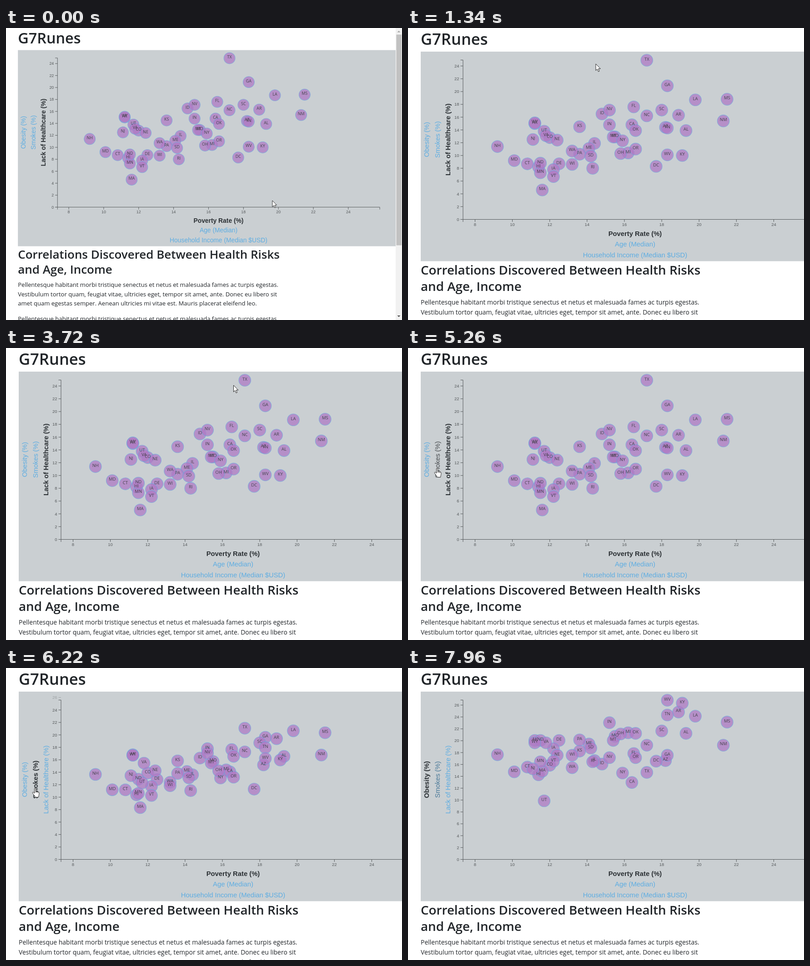
An HTML page that plays this animation: 871 by 643 pixels, repeating every 8000 ms.

```html
<!DOCTYPE html>
<html lang="en">
<head>
<meta charset="utf-8">
<title>Health risk chart</title>
<style>
  html, body { margin: 0; width: 100%; height: 100%; overflow: hidden; background: #fff; }
  svg { display: block; width: 871px; height: 643px; }
  .page { font-family: "Open Sans", "Noto Sans", sans-serif; fill: #212529; }
  .head { font-weight: 600; font-size: 27.74px; }
  .title { font-weight: 600; font-size: 34.6px; }
  .body { font-size: 13.97px; }
  .axis { font: 9.5px "Liberation Sans", Arial, sans-serif; fill: #55595b; }
  .axis path { fill: none; stroke: #55595b; }
  .label { font: 14.8px "Liberation Sans", Arial, sans-serif; fill: #5dade2; text-anchor: middle; }
  .on { font-weight: bold; fill: #2b3034; }
  .dot { fill: #af7ac5; stroke: #6ca3dd; stroke-width: 1.1; opacity: .75; }
  .code { font-size: 9.5px; text-anchor: middle; fill: #45424c; }
  .cursor { fill: #fff; stroke: #111; stroke-width: .9; stroke-linejoin: round; }
</style>
</head>
<body>
<svg id="stage" viewBox="0 0 871 643" xmlns="http://www.w3.org/2000/svg"></svg>
<script>
const LOOP = 8000;
const ZOOM = 1.0685;
const BASE = 421.5, TOP = 71, LEFT = 121;
const MOVE = 930, TO_SMOKES = 5795, TO_OBESITY = 7811;

// poverty, then code / lack of healthcare / smokes for each state
const rows = `9.2 NH 11.4 17.5
10.1 MD 9.2 14.6
10.8 CT 8.7 15.4
11.1 NJ 12.5 15.1
11.2 AK 15 19.9 WY 15.1 19.5
11.4 HI 8.2 14.1
11.5 MN 7.3 16.3 ND 8.8 19.9
11.6 MA 4.6 14.7
11.7 UT 13.8 9.7
11.8 VA 13.1 19.5
12 CO 12.8 15.7
12.2 IA 7.8 18.5 VT 6.7 16.4
12.4 NE 12.4 17.4
12.5 DE 8.7 19.9
13.2 WA 10.7 15.3 WI 8.6 17.4
13.6 KS 14.5 18.1 PA 10.2 20
14.1 ME 11.1 19.3
14.2 SD 9.9 18.6
14.3 RI 8 16.3
14.4 IL 11.9 16.5
14.8 ID 16.5 15.9
15.2 IN 14.8 22.9 NV 17.1 17
15.4 MT 12.9 19.9
15.5 MO 12.9 20.6
15.8 OH 10.3 21
15.9 NY 12.3 14.4
16.2 MI 10.4 21.2
16.4 CA 14.8 12.8
16.5 FL 17.6 17.7
16.6 OK 13.9 21.1 OR 11 17
17.2 NC 16.2 19.1 TX 24.9 14.5
17.7 DC 8.3 16.4
18 SC 17.1 21.5
18.2 AZ 14.4 16.5
18.3 GA 20.9 17.4 TN 14.3 24.2 WV 10.1 26.7
18.9 AR 16.3 24.7
19.1 KY 10 26.2
19.3 AL 13.9 21.1
19.8 LA 18.7 24
21.3 NM 15.4 19.1
21.5 MS 18.8 23`;

const states = rows.split('\n').flatMap(row => {
  const [poverty, ...rest] = row.split(' ');
  const list = [];
  for (let i = 0; i < rest.length; i += 3) {
    const smokes = +rest[i + 2];
    const obesity = Math.min(35.9, 15.5 + smokes * .78);
    list.push({ code: rest[i], poverty: +poverty, values: [+rest[i + 1], smokes, obesity] });
  }
  return list;
}).sort((a, b) => a.code < b.code ? -1 : 1);

const maxima = [24.9, 26.7, 35.9];
const steps = [2, 2, 5];

const stage = document.getElementById('stage');
function add(parent, tag, attrs = {}, text) {
  const el = document.createElementNS('http://www.w3.org/2000/svg', tag);
  for (const k in attrs) el.setAttribute(k, attrs[k]);
  if (text !== undefined) el.textContent = text;
  parent.appendChild(el);
  return el;
}

const clamp = v => Math.max(0, Math.min(1, v));
const lerp = (a, b, p) => a + (b - a) * p;
const span = (t, a, b) => clamp((t - a) / (b - a));
const smooth = p => p * p * (3 - 2 * p);
const cubic = p => p < .5 ? 4 * p ** 3 : 1 - (2 - 2 * p) ** 3 / 2;
const mix = (a, b, p) => `rgb(${a.map((c, i) => Math.round(lerp(c, b[i], p)))})`;
const xAt = v => 147.5 + (v - 8) * 41.06;
const yAt = (v, k) => BASE - v / maxima[k] * (BASE - TOP);

const page = add(stage, 'g', { class: 'page' });

// page text
add(page, 'text', { class: 'title', x: 28, y: 36.5 }, 'G7Runes');
[['Correlations Discovered Between Health Risks', 543], ['and Age, Income', 578.5]]
  .forEach(([s, y]) => add(page, 'text', { class: 'head', x: 28, y }, s));
const opening = 'Pellentesque habitant morbi tristique senectus et netus et malesuada fames ac turpis egestas.';
[[opening, 609],
 ['Vestibulum tortor quam, feugiat vitae, ultricies eget, tempor sit amet, ante. Donec eu libero sit', 631.2],
 ['amet quam egestas semper. Aenean ultricies mi vitae est. Mauris placerat eleifend leo.', 653.2],
 [opening, 689]]
  .forEach(([s, y]) => add(page, 'text', { class: 'body', x: 28, y }, s));

// chart panel and axes
add(page, 'rect', { x: 28, y: 52, width: 888, height: 461.5, fill: '#cacfd2' });
const axis = add(page, 'g', { class: 'axis' });
add(axis, 'path', { d: `M115.5 ${TOP - .5}H${LEFT}V${BASE}H115.5M${LEFT} 427V${BASE}H878.4V427` });
for (let v = 8; v <= 24; v += 2) {
  add(axis, 'path', { d: `M${xAt(v)} ${BASE}v5.5` });
  add(axis, 'text', { x: xAt(v), y: 436.3, 'text-anchor': 'middle' }, v);
}
const ticks = [];
for (let v = 0; v <= 35; v++) {
  if (v % 2 && v % 5) continue;
  const el = add(axis, 'g');
  add(el, 'path', { d: `M115.5 0H${LEFT}` });
  add(el, 'text', { x: 112.5, y: 3.3, 'text-anchor': 'end' }, v);
  ticks.push({ v, el });
}

// axis titles
[['Poverty Rate (%)', 458, 'label on'], ['Age (Median)', 481.3, 'label'],
 ['Household Income (Median $USD)', 504.5, 'label']]
  .forEach(([s, y, c]) => add(page, 'text', { class: c, x: 499.5, y }, s));
const labels = [['Lack of Healthcare (%)', 93.3], ['Smokes (%)', 69.7], ['Obesity (%)', 46.3]]
  .map(([s, x]) => add(page, 'text', { class: 'label', transform: `translate(${x} 245.7) rotate(-90)` }, s));

// states
const dots = states.map(s => add(page, 'circle', { class: 'dot', cx: xAt(s.poverty), r: 13.3 }));
const codes = states.map(s => add(page, 'text', { class: 'code', x: xAt(s.poverty) }, s.code));

// scrollbar
const bar = add(page, 'g', { transform: `scale(${ZOOM})` });
add(bar, 'rect', { x: 857, y: 0, width: 15, height: 644, fill: '#f1f1f1' });
add(bar, 'rect', { x: 858.5, y: 14.5, width: 11.5, height: 464, fill: '#c1c1c1' });
add(bar, 'path', { d: 'M860.5 9.5L864 6L867.5 9.5Z', fill: '#a3a3a3' });
add(bar, 'path', { d: 'M860.5 633L864 636.5L867.5 633Z', fill: '#505050' });

// pointers
const arrow = add(page, 'path', { class: 'cursor', d: 'M0 0V14.6L3.3 11.5L5.6 17L8 16L5.7 10.7H10.3Z' });
const hand = add(page, 'g', { class: 'cursor' });
add(hand, 'path', { d: 'M-1.4 1.4C-1.4-.5 1.4-.5 1.4 1.4V7L7 8.2C8.6 8.6 9 9.6 9 11C9 14 8 15.4 7.6 20H.2C-.8 16.6-3.6 14-5.6 10.8C-6.4 9.2-4.4 8.2-3.2 9.4L-1.4 11.2Z' });
add(hand, 'path', { d: 'M1.4 7V10.5M4 7.7V10.7M6.5 8.2V11', fill: 'none', 'stroke-width': .7 });

const route = [
  [0, 626, 406], [90, 626, 406], [870, 360, 117], [960, 358, 114], [1060, 358, 114],
  [1340, 413, 79], [1700, 515, 82], [1950, 456, 80], [2330, 600, -4], [3630, 600, -4],
  [3720, 500.5, 82], [4410, 149, 245], [4710, 149, 245], [5260, 64, 264.5],
  [6830, 64, 264.5], [7380, 41, 250], [LOOP, 41, 250]
];
function pointerAt(t) {
  const i = route.findIndex(r => r[0] > t);
  const a = route[i - 1], b = route[i];
  const p = smooth(span(t, a[0], b[0]));
  return [lerp(a[1], b[1], p), lerp(a[2], b[2], p)];
}

const BLUE = [93, 173, 226], DARK = [43, 48, 52], HOVER = [72, 76, 79];
function setLabel(k, active, color) {
  labels[k].setAttribute('class', active ? 'label on' : 'label');
  labels[k].style.fill = color;
}

function drawChart(t) {
  const from = t < TO_OBESITY ? 0 : 1, to = from + 1;
  const begin = from ? TO_OBESITY : TO_SMOKES;
  const p = cubic(span(t, begin, begin + MOVE));

  states.forEach((s, i) => {
    const y = lerp(yAt(s.values[from], from), yAt(s.values[to], to), p);
    dots[i].setAttribute('cy', y);
    codes[i].setAttribute('y', y + .5);
  });

  const has = (v, k) => v % steps[k] === 0 && v <= maxima[k] ? 1 : 0;
  ticks.forEach(({ v, el }) => {
    const y = lerp(yAt(v, from), yAt(v, to), p);
    el.setAttribute('transform', `translate(0 ${y})`);
    el.setAttribute('opacity', lerp(has(v, from), has(v, to), p));
  });
}

function drawLabels(t) {
  const active = t < 5830 ? 0 : t < 7860 ? 1 : 2;
  setLabel(0, active === 0, mix(DARK, BLUE, span(t, 5830, 6100)));
  setLabel(1, active === 1, active === 0 ? mix(BLUE, HOVER, span(t, 4950, 5220))
    : mix(DARK, BLUE, span(t, 7800, 8080)));
  setLabel(2, active === 2, active === 2 ? mix(DARK, DARK, 0)
    : mix(BLUE, HOVER, span(t, 7150, 7380)));
}

function drawPointer(t) {
  const [x, y] = pointerAt(t);
  const pointing = t > 4710 && x < 74;
  const at = `translate(${x} ${y})`;
  arrow.setAttribute('transform', at);
  hand.setAttribute('transform', at);
  arrow.setAttribute('visibility', pointing ? 'hidden' : 'visible');
  hand.setAttribute('visibility', pointing && t < 7860 ? 'visible' : 'hidden');
}

function draw(t) {
  page.setAttribute('transform', `scale(${lerp(1 / ZOOM, 1, smooth(span(t, 90, 870)))})`);
  drawChart(t);
  drawLabels(t);
  drawPointer(t);
}

const start = performance.now();
function frame() {
  draw((performance.now() - start) % LOOP);
  requestAnimationFrame(frame);
}
frame();
</script>
</body>
</html>
```
